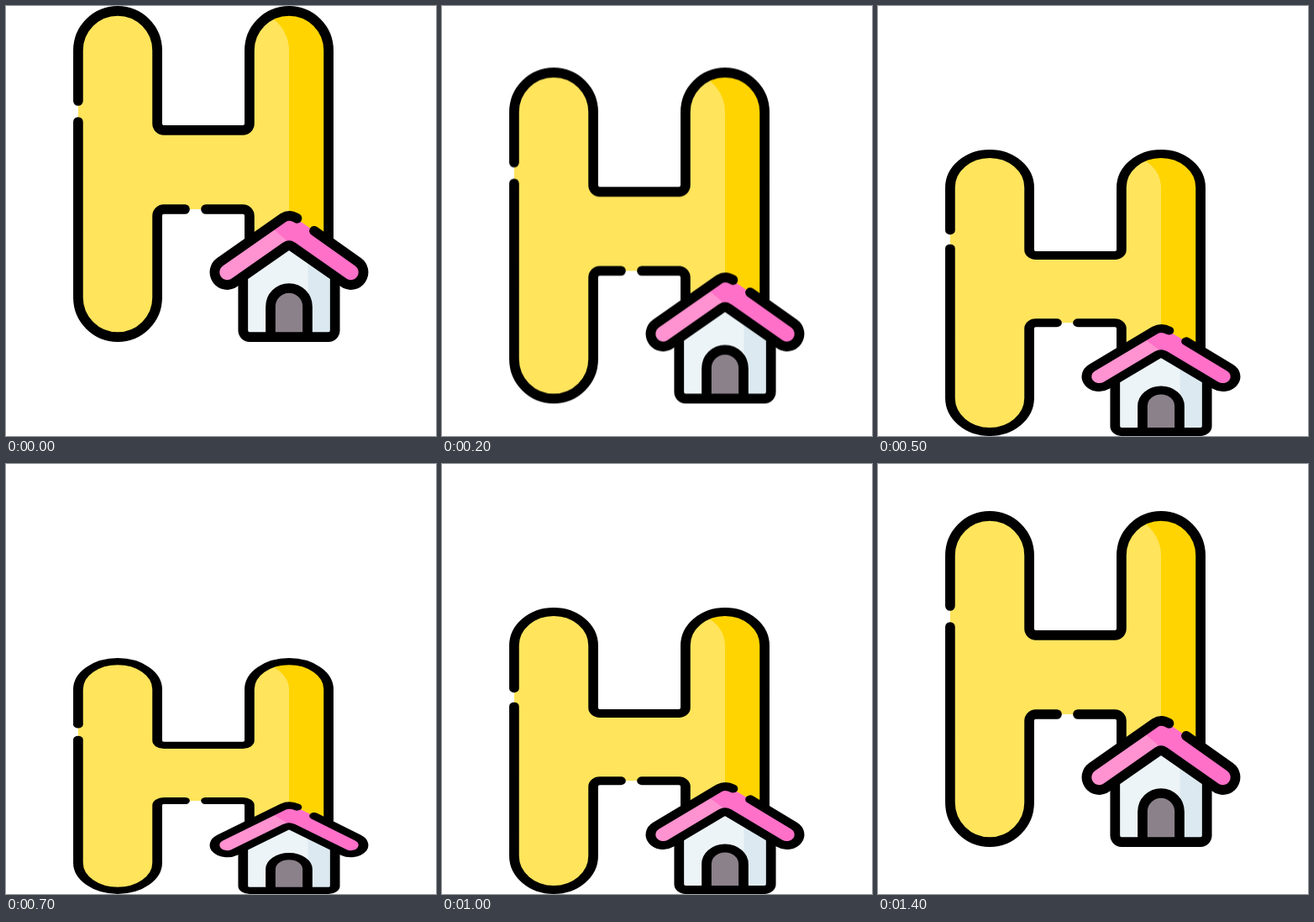
Animation of 512x512 px, one loop 1500 ms. Source, as an HTML page:

```html
<!DOCTYPE html>
<html lang="en">
<head>
<meta charset="utf-8">
<title>H for house</title>
<style>
  html, body { margin: 0; height: 100%; overflow: hidden; background: #fff; }
  svg { display: block; width: 100%; height: 100%; }

  .line { fill: none; stroke: #000; stroke-width: 11.7; stroke-linecap: round; stroke-linejoin: round; }

  /* Falls, squashes against the floor, springs back; ten poses a second. */
  .icon { transform-origin: 0 400px; animation: bounce 1.5s infinite; }
  @keyframes bounce {
    0%     { transform: translateY(0) scaleY(1); animation-timing-function: steps(3); }
    19.99% { transform: translateY(110px) scaleY(1); animation-timing-function: step-end; }
    26.66% { transform: translateY(112px) scaleY(.9275); animation-timing-function: steps(3); }
    46.66% { transform: translateY(112px) scaleY(.7025); animation-timing-function: step-end; }
    53.33% { transform: translateY(112px) scaleY(.7025); animation-timing-function: steps(3); }
    73.33% { transform: translateY(112px) scaleY(.9275); animation-timing-function: step-end; }
    79.99% { transform: translateY(112px) scaleY(1); animation-timing-function: steps(2); }
    93.33%, 100% { transform: translateY(56px) scaleY(1); animation-timing-function: step-end; }
  }
</style>
</head>
<body>
<svg viewBox="0 0 512 512">
  <defs>
    <path id="roof" d="M254.8 304.7 L330 252.1 Q337 247.5 344 252.1 L419.2 304.7
      A15 15 0 0 1 402 329.3 L341 286.6 Q337 284 333 286.6 L272 329.3 A15 15 0 0 1 254.8 304.7Z"/>
    <clipPath id="roofClip"><use href="#roof"/></clipPath>
  </defs>

  <g class="icon">
    <!-- letter -->
    <path fill="#ffe45c" d="M85.9 53 A47.1 47.1 0 0 1 180.1 53 V140 A7.8 7.8 0 0 0 187.9 147.8 H282.1 A7.8 7.8 0 0 0 289.9 140 V53
      A47.1 47.1 0 0 1 384.1 53 V300 H289.9 V249.8 A7.8 7.8 0 0 0 282.1 242 H187.9 A7.8 7.8 0 0 0 180.1 249.8 V347
      A47.1 47.1 0 0 1 85.9 347Z"/>
    <path fill="#ffd400" d="M313.5 12.2 A47.1 47.1 0 0 1 384.1 53 V300 H337 V53 A47.1 47.1 0 0 0 313.5 12.2Z"/>
    <path class="line" d="M85.9 113 V53 A47.1 47.1 0 0 1 180.1 53 V140 A7.8 7.8 0 0 0 187.9 147.8 H282.1 A7.8 7.8 0 0 0 289.9 140 V53
      A47.1 47.1 0 0 1 384.1 53 V290 M289.9 290 V249.8 A7.8 7.8 0 0 0 282.1 242 H238
      M213 242 H187.9 A7.8 7.8 0 0 0 180.1 249.8 V347 A47.1 47.1 0 0 1 85.9 347 V138"/>

    <!-- walls and door -->
    <path fill="#edf4f7" d="M282.3 318 L337 282 L391.7 318 V386.3 A7.8 7.8 0 0 1 383.9 394.1 H290.1 A7.8 7.8 0 0 1 282.3 386.3Z"/>
    <path fill="#dce9f0" d="M359.5 297 L391.7 318 V386.3 A7.8 7.8 0 0 1 383.9 394.1 H359.5Z"/>
    <path fill="#8b818a" d="M315 394 V358 A22 22 0 0 1 359 358 V394Z"/>
    <path class="line" d="M282.3 322 V386.3 A7.8 7.8 0 0 0 290.1 394.1 H383.9 A7.8 7.8 0 0 0 391.7 386.3 V322
      M315 394 V358 A22 22 0 0 1 359 358 V394"/>

    <!-- roof -->
    <use href="#roof" fill="#ff92d0"/>
    <path fill="#ff70c8" clip-path="url(#roofClip)" d="M314 262 L334 279 V292 L440 350 V230 H314Z"/>
    <path class="line" d="M367 267.8 L419.2 304.7 A15 15 0 0 1 402 329.3 L341 286.6 Q337 284 333 286.6
      L272 329.3 A15 15 0 0 1 254.8 304.7 L330 252.1 Q337.5 247.2 346.5 252.8"/>
  </g>
</svg>
</body>
</html>
```
